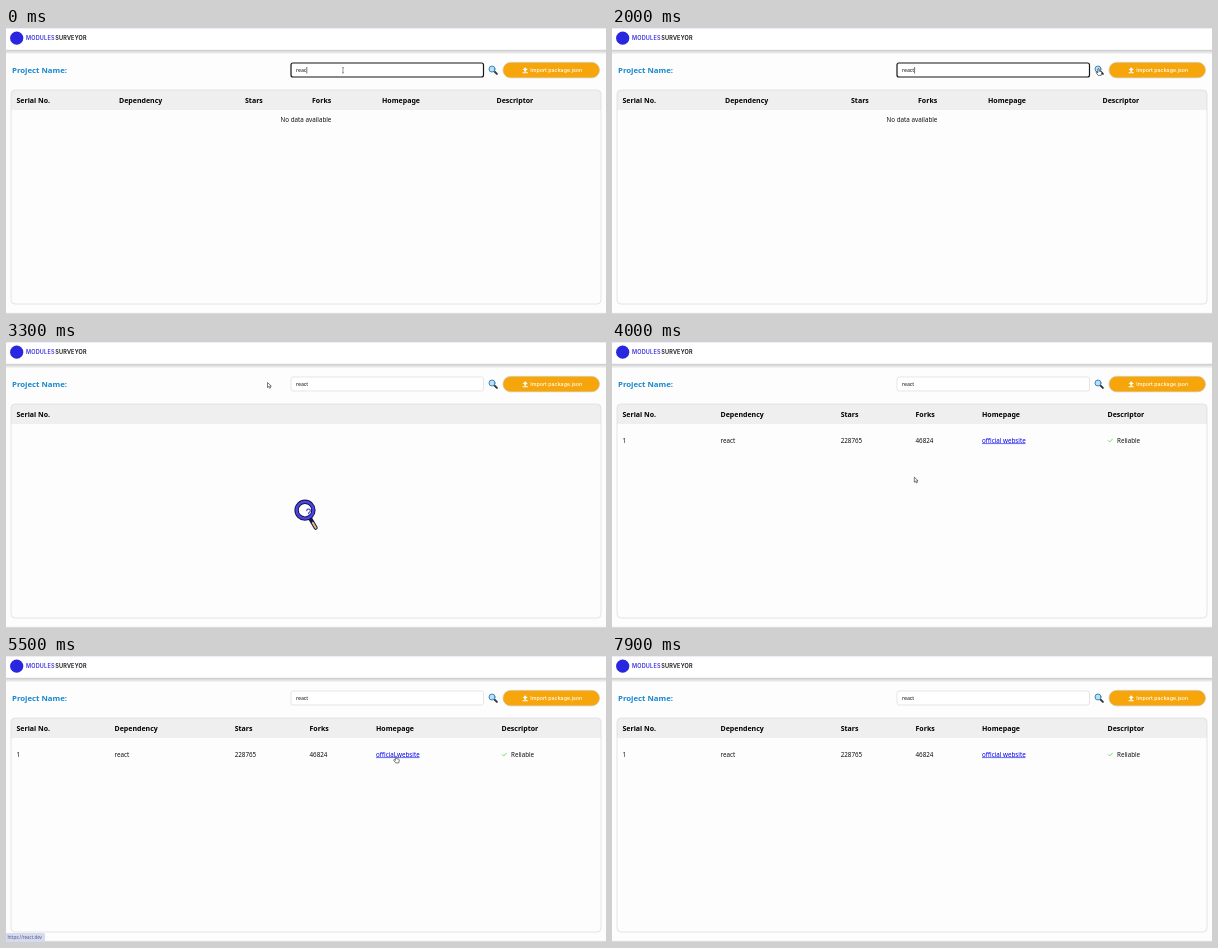
An HTML page that plays this animation: 600x286 px, repeating every 8000 ms.

```html
<!DOCTYPE html>
<html lang="en">
<head>
<meta charset="utf-8">
<style>
  html, body { margin: 0; width: 100%; height: 100%; overflow: hidden; background: #fdfdfd; }
  svg { display: block; width: 600px; height: 286px; }
  text { font: 6.25px "Noto Sans", "Open Sans", sans-serif; fill: #111; white-space: pre; }
  .head { font-size: 7.03px; font-weight: 600; fill: #000; }
  .title { font-size: 7.81px; font-weight: 600; fill: #1787cf; }
  .field { font-size: 5.2px; }
  .brand { font: 600 5.5px Inter, sans-serif; letter-spacing: .2px; }
  .button { font: 500 5.3px Inter, sans-serif; fill: #fff; }
  .status { font-size: 4.45px; fill: #555b78; }
</style>
</head>
<body>
<svg viewBox="0 0 600 286">
  <defs>
    <linearGradient id="shade" x2="0" y2="1">
      <stop stop-color="#c6c6ca"/><stop offset="1" stop-color="#fdfdfd"/>
    </linearGradient>
  </defs>

  <rect width="600" height="286" fill="#fdfdfd"/>
  <rect y="21.5" width="600" height="5" fill="url(#shade)"/>
  <rect width="600" height="21.7" fill="#fff"/>
  <rect width="600" height="1" fill="#ededfa"/>
  <circle cx="10.7" cy="10.2" r="6.6" fill="#2826df"/>
  <text class="brand" x="20" y="12.3" style="fill:#3b32e2">MODULES</text>
  <text class="brand" x="49.2" y="12.3">SURVEYOR</text>

  <text class="title" x="6" y="45.1">Project Name:</text>
  <rect id="box" x="285" y="35" width="192.5" height="14" rx="2" fill="#fff"/>
  <text id="query" class="field" x="290" y="44"></text>
  <path id="caret" d="M0 39v6.5" stroke="#111" stroke-width=".6"/>

  <g stroke-linecap="round">
    <path d="M488.2 43.2l2.7 2.7" stroke="#333b42" stroke-width="2"/>
    <circle cx="486" cy="41" r="3" fill="#b9e0fa" stroke="#3f86b5" stroke-width="1"/>
  </g>

  <rect x="497" y="34.4" width="96.5" height="15.4" rx="7.7" fill="#f6a50b" stroke="#d5c29a" stroke-width=".7"/>
  <path d="M519.2 39.2l2.6 2.8h-1.6v1.8h-2v-1.8h-1.6zM516.6 44.3h5.2v1h-5.2z" fill="#fff"/>
  <text class="button" x="524.3" y="44">Import package.json</text>

  <rect x="5" y="62" width="590" height="214" rx="4" fill="#fdfdfd"/>
  <path d="M5 82V66q0-4 4-4h582q4 0 4 4v16z" fill="#efefef"/>
  <rect x="5" y="62" width="590" height="214" rx="4" fill="none" stroke="#dedee0" stroke-width=".8"/>
  <path d="M0 285.4h600" stroke="#d6d6da"/>

  <g id="empty"><text x="300" y="94.2" text-anchor="middle">No data available</text></g>
  <g id="loading">
    <text class="head" x="10.5" y="74.6">Serial No.</text>
    <g stroke-linecap="round">
      <path d="M304.5 177l5.2 8.8" stroke="#17164a" stroke-width="4"/>
      <path d="M306.8 180.8l2.9 5" stroke="#dfb97d" stroke-width="2"/>
      <circle cx="299" cy="168.2" r="8.4" fill="#fff" stroke="#17164a" stroke-width="4.4"/>
      <circle cx="299" cy="168.2" r="8.4" fill="none" stroke="#4947e5" stroke-width="2.4"/>
      <path d="M300.8 168.6c.2-2.4 4-2 3.5.4-.2 1.2-1.6 1.2-1.7 2.6m0 1.9v.1" fill="none" stroke="#3937cf" stroke-width="1.1"/>
    </g>
  </g>
  <g id="result">
    <path d="M496 98.3l1.7 1.7 3-3.2" fill="none" stroke="#76dc76" stroke-width="1"/>
    <path d="M370 101.6h43.5" stroke="#00e" stroke-width=".6"/>
  </g>

  <g id="status">
    <path d="M0 277h37q2 0 2 2v7H0z" fill="#d6daf1"/>
    <text class="status" x="1.5" y="283">https://react.dev</text>
  </g>

  <g id="cursor" stroke-linejoin="round">
    <path id="arrow" d="M0 0v5l1.2-1 .9 1.8 1-.5-.9-1.7h1.6z" fill="#fff" stroke="#222" stroke-width=".6"/>
    <path id="beam" d="M-1-2.8q1 0 1 .7q0-.7 1-.7M0-2.1v4.2M-1 2.8q1 0 1-.7q0 .7 1 .7" fill="none" stroke="#333" stroke-width=".5"/>
    <path id="hand" d="M-.6.4q.6-.9 1.2 0v2.2l2 .5q.8.3.7 1.2l-.6 2.6h-3l-2-2.6q0-.9.8-.6l.9.7z" fill="#fff" stroke="#222" stroke-width=".6"/>
  </g>
</svg>
<script>
const LOOP = 8000, SEARCH = 2300, LOADED = 3800;
const $ = id => document.getElementById(id);
const show = (id, on) => $(id).style.display = on ? '' : 'none';

const labels = ['Serial No.', 'Dependency', 'Stars', 'Forks', 'Homepage', 'Descriptor'];
const values = ['1', 'react', '228765', '46824', 'official website', 'Reliable'];
const emptyX = [10.5, 113, 239, 306, 376, 490.5];
const resultX = [10.5, 108.5, 228.7, 303.5, 370, 495.5];

function addText(parent, x, y, content, className = '', fill = '') {
  const el = document.createElementNS('http://www.w3.org/2000/svg', 'text');
  el.setAttribute('x', x);
  el.setAttribute('y', y);
  el.setAttribute('class', className);
  el.style.fill = fill;
  el.textContent = content;
  $(parent).append(el);
}
labels.forEach((label, i) => {
  addText('empty', emptyX[i], 74.6, label, 'head');
  addText('result', resultX[i], 74.6, label, 'head');
  addText('result', i == 5 ? 505 : resultX[i], 100.6, values[i], '', i == 4 ? '#00e' : '');
});

// Pointer stops: time, x, y
const path = [
  [0, 337, 42.3], [900, 337, 42.3], [1700, 486.5, 40.5], [2400, 486.5, 40.5],
  [3200, 261.5, 40.5], [3500, 261.5, 40.5], [4000, 302.3, 135.2],
  [4500, 302.3, 135.2], [5200, 390, 100], [LOOP, 390, 100]
];
function pointerAt(t) {
  const i = path.findIndex(p => p[0] > t);
  const [t0, x0, y0] = path[i - 1], [t1, x1, y1] = path[i];
  const u = (t - t0) / (t1 - t0), k = u * u * (3 - 2 * u);
  return [x0 + (x1 - x0) * k, y0 + (y1 - y0) * k];
}
const within = (x, y, l, t, r, b) => x >= l && x <= r && y >= t && y <= b;

function draw(t) {
  const focused = t < SEARCH, typed = t < 100 ? 'reac' : 'react';
  show('empty', focused);
  show('loading', !focused && t < LOADED);
  show('result', t >= LOADED);

  $('query').textContent = typed;
  $('box').setAttribute('stroke', focused ? '#161616' : '#dcdce0');
  $('box').setAttribute('stroke-width', focused ? 1.2 : .7);
  $('caret').setAttribute('transform', `translate(${typed == 'reac' ? 300.8 : 302.6})`);
  show('caret', focused && t % 1000 < 500);

  const [x, y] = pointerAt(t);
  const beam = within(x, y, 285, 35, 477, 49);
  const link = t >= LOADED && within(x, y, 370, 94, 414, 103);
  const hand = link || within(x, y, 481, 36, 492, 48);
  $('cursor').setAttribute('transform', `translate(${x} ${y})`);
  show('cursor', t < 5900);
  show('beam', beam);
  show('hand', hand);
  show('arrow', !beam && !hand);
  show('status', link && t < 7600);
}

const start = performance.now();
function tick() {
  draw((performance.now() - start) % LOOP);
  requestAnimationFrame(tick);
}
tick();
</script>
</body>
</html>
```
